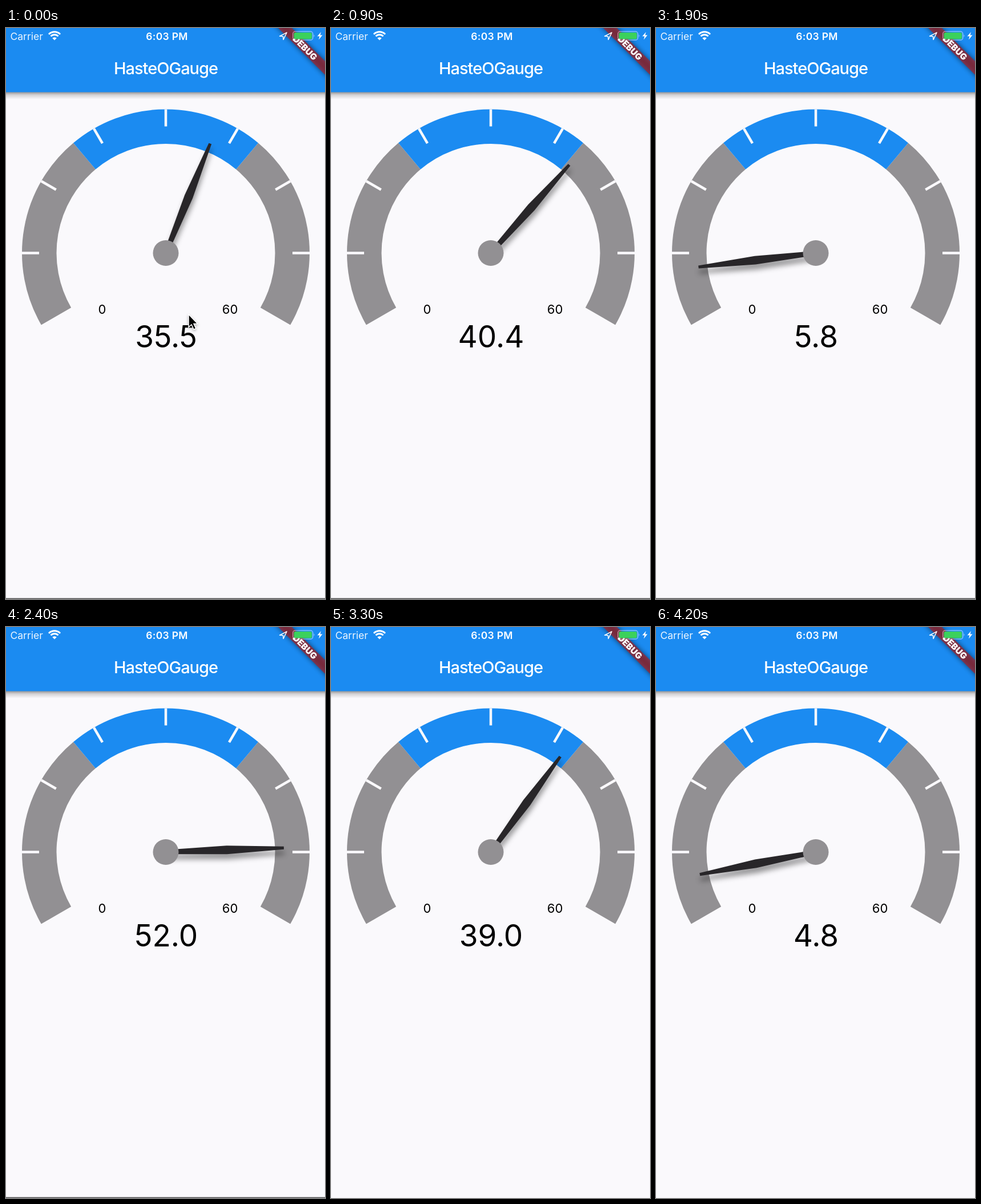
These frames come from a looping animation (559 px wide and 1001 px high, 4.3 s). An HTML page:

```html
<!DOCTYPE html>
<html lang="en">
<head>
<meta charset="utf-8">
<title>Gauge</title>
<style>
  html, body { margin: 0; width: 100%; height: 100%; overflow: hidden; background: #faf9fc; }
  svg { display: block; width: 559px; height: 1001px; font-family: Inter, sans-serif; }
  .mid { text-anchor: middle; }
  .arc { fill: none; stroke-width: 60.5; }
  #shade { filter: drop-shadow(1px 9px 5px rgba(0, 0, 0, .4)); }
  #cursor { filter: drop-shadow(0 2px 2px rgba(0, 0, 0, .3)); }
</style>
</head>
<body>
<svg viewBox="0 0 559 1001">
  <defs>
    <linearGradient id="drop" x2="0" y2="1">
      <stop offset="0" stop-color="#000" stop-opacity=".42"/>
      <stop offset=".4" stop-color="#000" stop-opacity=".16"/>
      <stop offset="1" stop-color="#000" stop-opacity="0"/>
    </linearGradient>
    <filter id="blur" x="-20%" y="-150%" width="140%" height="400%">
      <feGaussianBlur stdDeviation="5"/>
    </filter>
  </defs>

  <rect width="559" height="1001" fill="#faf9fc"/>

  <!-- App bar -->
  <rect y="112" width="559" height="13" fill="url(#drop)"/>
  <rect width="559" height="112.5" fill="#1b8bf1"/>
  <text class="mid" x="280" y="81" font-size="29" font-weight="500" letter-spacing="-1" fill="#fff">HasteOGauge</text>

  <!-- Corner banner -->
  <g transform="translate(559 0) rotate(45)">
    <rect x="-70" y="41" width="140" height="17" opacity=".55" filter="url(#blur)"/>
    <rect x="-70" y="41" width="140" height="17" fill="#b71c1c" fill-opacity=".63"/>
    <text class="mid" y="55" font-size="15.2" font-weight="900" fill="#fff">DEBUG</text>
  </g>

  <!-- Status bar -->
  <g fill="#fff">
    <text x="7.5" y="20.5" font-size="17.5" fill-opacity=".92">Carrier</text>
    <text class="mid" x="282" y="20.5" font-size="17.5" font-weight="600" letter-spacing=".3">6:03 PM</text>
    <g fill="none" stroke="#fff" stroke-width="3">
      <path d="M75 11a14 14 0 0 1 20 0M78.5 14.5a9.2 9.2 0 0 1 13 0"/>
    </g>
    <path d="M85 21.5l-3.8-3.8a5.4 5.4 0 0 1 7.6 0z"/>
    <path d="M492 8L479.500 14.300L485.500 14.800L486 20.500Z" fill="none" stroke="#fff" stroke-width="1.5" stroke-linejoin="round"/>
    <rect x="502.700" y="6.200" width="35" height="15" rx="4" fill="none" stroke="#fff" stroke-opacity=".55" stroke-width="1.3"/>
    <rect x="504.500" y="8" width="31.500" height="11.500" rx="2.500" fill="#3bd15c"/>
    <path d="M539.500 11.500q2 2.200 0 4.500z" fill-opacity=".6"/>
    <path d="M552 7L545.500 14.500H549.500L548 20.500L554.500 12.500H550.500Z"/>
  </g>

  <!-- Dial -->
  <g transform="translate(280 394.5)">
    <g id="dial"></g>
    <g id="shade"><path id="needle" fill="#282629" d="M-3.700 0L-7.500 -107L-2.500 -207H2.500L7.500 -107L3.700 0Z"/></g>
    <circle r="22.500" fill="#929093"/>
  </g>
  <g class="mid">
    <text x="168.500" y="501" font-size="22">0</text>
    <text x="392.500" y="501" font-size="22">60</text>
    <text id="value" x="280.500" y="560" font-size="53"></text>
  </g>

  <path id="cursor" d="M320 502V524.500L325 520L329 528.500L332.800 526.800L329 518.500H335.800Z" stroke="#fff" stroke-width="1.500"/>
  <rect id="edge" y="999.500" width="559" height="1.500" fill="#555"/>
</svg>
<script>
const LOOP = 4300, STEP = 100, LEAD = 58;
const targets = [24.5, 44.7, 0.8, 52, 39, 4.3];
const $ = id => document.getElementById(id);

const polar = (r, deg) => {
  const a = deg * Math.PI / 180;
  return `${r * Math.sin(a)} ${-r * Math.cos(a)}`;
};

function add(d, color, width, cls = '') {
  const p = document.createElementNS('http://www.w3.org/2000/svg', 'path');
  p.setAttribute('d', d);
  p.setAttribute('stroke', color);
  p.setAttribute('stroke-width', width);
  p.setAttribute('class', cls);
  $('dial').append(p);
}

function arc(from, to, color) {
  const r = 221.75;
  add(`M${polar(r, from)}A${r} ${r} 0 0 1 ${polar(r, to)}`, color, 60.5, 'arc');
}

arc(-120, -40, '#929093');
arc(40, 120, '#929093');
arc(-40, 40, '#1b8bf1');
for (let a = -90; a <= 90; a += 30) add(`M${polar(222, a)}L${polar(252, a)}`, '#faf9fc', 4.5);

// Each second a new target arrives; a lerp with growing weight leaves this share of the gap.
const remaining = s => Math.exp(-30 * s * s - 10 * s ** 3);

function speedAt(t) {
  const since = t + 100 + LEAD;
  const i = Math.floor(since / 1000);
  const from = targets[i], to = targets[i + 1];
  return to + (from - to) * remaining(since % 1000 / 1000);
}

function draw(now) {
  const t = Math.floor(now % LOOP / STEP) * STEP;
  const speed = speedAt(t);
  $('needle').setAttribute('transform', `rotate(${speed * 4 - 120})`);
  $('value').textContent = speed.toFixed(1);
  $('cursor').style.display = t < 100 ? '' : 'none';
  $('edge').style.display = t < 2900 ? '' : 'none';
}

const start = performance.now();
function tick() {
  draw(performance.now() - start);
  requestAnimationFrame(tick);
}
tick();
</script>
</body>
</html>
```
